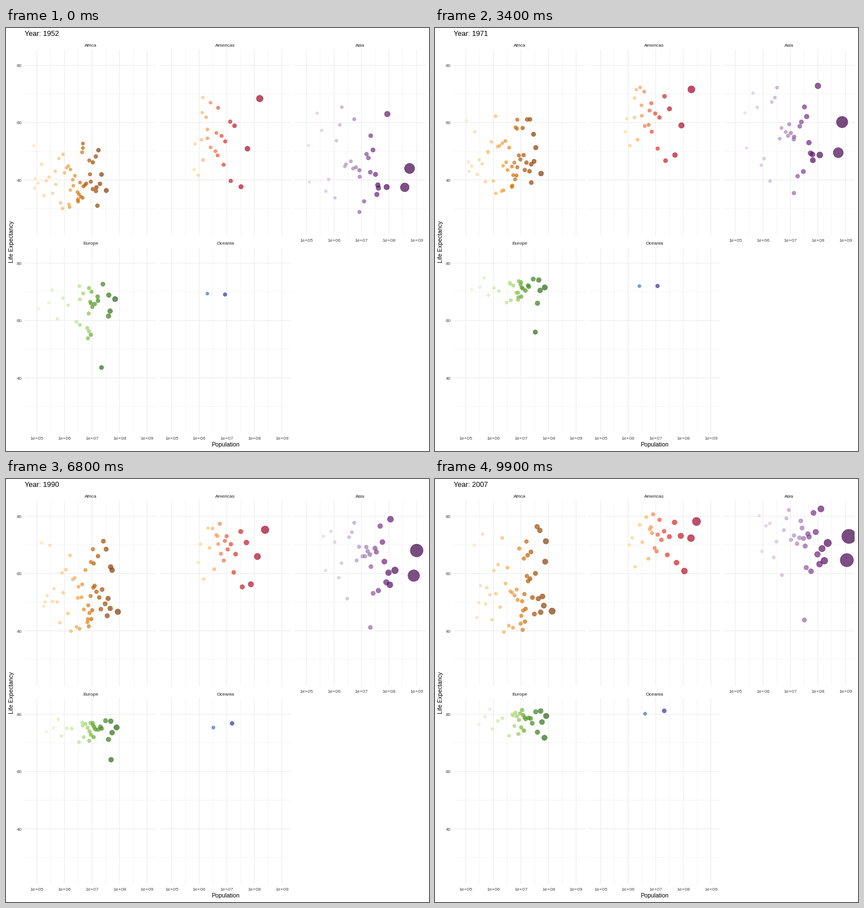
Recreate the animation shown at these times as a matplotlib script. Size 748 by 748 pixels, loop 10000 ms.

```python
import numpy as np
import matplotlib.pyplot as plt
from matplotlib.animation import FuncAnimation
from matplotlib.collections import LineCollection
from matplotlib.colors import LinearSegmentedColormap
from matplotlib.patches import Rectangle

SIZE, DPI = 748, 64
PT = 0.955 * 72 / DPI              # theme units to points
FRAMES, STEP = 100, 100
LEFT, TOP, PW, PH = 33.1, 37.9, 232.8, 328.7
PITCH_X, PITCH_Y = PW + 5.5, 350
LOG_MIN, LOG_MAX = 4.561, 9.337
LIFE_MIN, LIFE_MAX = 20.649, 85.553
POP_MIN, POP_MAX = 6.0e4, 1.319e9
START, END = 1952, 2007
LIFE_YEARS = (START, 1967, 1985, END)
QUARTILES = np.linspace(0, 1, 5)

rng = np.random.default_rng(7)
plt.rcParams["font.family"] = ["Liberation Sans", "DejaVu Sans"]
fig = plt.figure(figsize=(SIZE / DPI, SIZE / DPI), dpi=DPI, facecolor="white")
ax = fig.add_axes([0, 0, 1, 1])
ax.set(xlim=(0, SIZE), ylim=(SIZE, 0))
ax.axis("off")


def text(x, y, s, size, color="black", ha="center", **kw):
    return ax.text(x, y, s, fontsize=size * PT, color=color, ha=ha, va="baseline", **kw)


def ranks(values):
    return np.argsort(np.argsort(values))


class Panel:
    def __init__(self, name, col, row, *stops):
        self.name, self.stops = name, stops
        self.x0, self.y0 = LEFT + col * PITCH_X, TOP + row * PITCH_Y
        self.logs, self.lives = [], []

    def country(self, pop_start, pop_end, *life):
        """One country: population in millions, life expectancy at LIFE_YEARS."""
        self.logs.append(6 + np.log10([pop_start, pop_end]))
        self.lives.append(life)

    def crowd(self, n, logs_start, logs_end, ranges, drift=0.3):
        """n countries spread over population quartiles and (low, middle, high) life ranges."""
        u = (np.arange(n) + rng.uniform(-0.3, 0.3, n)) / (n - 1)
        start = np.interp(u, QUARTILES, logs_start) + rng.normal(0, 0.05, n)
        self.logs.extend(np.column_stack([start, np.interp(u, QUARTILES, logs_end)]))
        order = rng.random(n)
        columns = []
        for low, mid, high in ranges:
            s = 2 * ranks(order) / (n - 1) - 1
            s *= np.abs(s) ** 0.4          # gather towards the middle
            columns.append(np.interp(s, (-1, 0, 1), (low, mid, high)))
            order = order + rng.normal(0, drift / 3, n)
        self.lives.extend(np.column_stack(columns))

    def px(self, log_pop):
        return self.x0 + (log_pop - LOG_MIN) / (LOG_MAX - LOG_MIN) * PW

    def py(self, life):
        return self.y0 + (LIFE_MAX - life) / (LIFE_MAX - LIFE_MIN) * PH

    def grid(self, logs, lives, width):
        x0, y0 = self.x0, self.y0
        lines = [[(self.px(v), y0), (self.px(v), y0 + PH)] for v in logs]
        lines += [[(x0, self.py(v)), (x0 + PW, self.py(v))] for v in lives]
        art = LineCollection(lines, colors="#EBEBEB", linewidths=width * PT, zorder=1)
        art.set_snap(False)
        ax.add_collection(art, autolim=False)

    def build(self):
        self.grid(np.arange(5.5, 9), (30, 50, 70), 0.53)
        self.grid(range(5, 10), (40, 60, 80), 1.07)
        text(self.x0 + PW / 2, self.y0 - 4.8, self.name, 8.8, "#1A1A1A")
        self.logs, self.lives = np.array(self.logs), np.array(self.lives)
        n = len(self.logs)
        cmap = LinearSegmentedColormap.from_list(self.name, self.stops, N=n)
        colors = cmap(ranks(-self.logs[:, 1]))
        colors[:, 3] = 0.7
        self.dots = ax.scatter(np.zeros(n), np.zeros(n), c=colors, edgecolors=colors,
                               linewidths=0.71 * PT, zorder=2)
        self.dots.set_clip_path(Rectangle((self.x0, self.y0), PW, PH, transform=ax.transData))

    def x_labels(self):
        for v in range(5, 10):
            text(self.px(v), self.y0 + PH + 11.0, f"1e+0{v}", 8.8, "#4D4D4D")

    def y_labels(self):
        for v in (40, 60, 80):
            text(self.x0 - 4.7, self.py(v) + 3.0, str(v), 8.8, "#4D4D4D", "right")

    def update(self, year):
        t = (year - START) / (END - START)
        logs = self.logs[:, 0] * (1 - t) + self.logs[:, 1] * t
        life = np.array([np.interp(year, LIFE_YEARS, row) for row in self.lives])
        share = np.clip((10 ** logs - POP_MIN) / (POP_MAX - POP_MIN), 0, 1)
        size = 2 + 10 * np.sqrt(share)
        diameter = 0.75 * (size * 2.845 + 0.945)
        self.dots.set_offsets(np.column_stack([self.px(logs), self.py(life)]))
        self.dots.set_sizes((diameter * PT) ** 2)


africa = Panel("Africa", 0, 0, "#7F3B08", "#B35806", "#E08214", "#FDB863", "#FEE0B6")
africa.crowd(50, (4.78, 5.92, 6.42, 6.75, 7.32), (5.30, 6.28, 6.98, 7.26, 7.88),
             [(30, 38.8, 52.7), (34, 44.6, 61.5), (40, 51.6, 71), (39.6, 52.9, 76.4)])
africa.country(22.2, 80.3, 41.9, 49.3, 58.4, 71.3)
africa.country(33.1, 135, 36.3, 41, 46.6, 46.9)

americas = Panel("Americas", 1, 0, "#A50026", "#D73027", "#F46D43", "#FDAE61", "#FEE090")
americas.crowd(23, (5.82, 6.18, 6.46, 6.80, 7.48), (6.02, 6.72, 6.95, 7.32, 8.04),
               [(37.6, 54, 68.8), (45, 60.5, 72.1), (53, 69, 76.5), (60.9, 72.9, 80.7)])
americas.country(56.6, 190, 50.9, 57.6, 64.2, 72.4)
americas.country(157.6, 301, 68.4, 70.8, 74.5, 78.2)

asia = Panel("Asia", 2, 0, "#40004B", "#762A83", "#9970AB", "#C2A5CF", "#E7D4E8")
asia.crowd(28, (5.08, 6.13, 6.72, 7.25, 7.67), (5.85, 6.75, 7.36, 7.68, 8.23),
           [(32.5, 44.5, 65.4), (37, 53.7, 71), (49, 65, 76.5), (59.5, 72.4, 82.2)])
asia.country(8.43, 31.9, 28.8, 34, 40.5, 43.8)
asia.country(82.1, 224, 37.5, 46, 58.5, 70.7)
asia.country(86.5, 127.5, 63, 71.4, 78, 82.6)
asia.country(372, 1110, 37.4, 47.2, 57.8, 64.7)
asia.country(556, 1319, 44, 58.4, 66.7, 73)

europe = Panel("Europe", 0, 1, "#276419", "#4D9221", "#7FBC41", "#B8E186", "#E6F5D0")
europe.crowd(28, (5.17, 6.55, 6.85, 7.02, 7.70), (5.48, 6.67, 6.96, 7.18, 7.79),
             [(53.8, 65.9, 72.7), (64.8, 70.5, 74.2), (69.6, 74.2, 77.2), (72.5, 78.6, 81.8)])
europe.country(22.2, 71.2, 43.6, 54.3, 62, 71.8)
europe.country(69.1, 82.4, 67.5, 70.8, 74.3, 79.4)

oceania = Panel("Oceania", 1, 1, "#313695", "#4575B4")
oceania.country(8.69, 20.4, 69.1, 71.1, 75.6, 81.2)
oceania.country(1.99, 4.12, 69.4, 71.5, 74, 80.2)

panels = (africa, americas, asia, europe, oceania)
for panel in panels:
    panel.build()
for panel in (asia, europe, oceania):
    panel.x_labels()
for panel in (africa, europe):
    panel.y_labels()
text(387.8, 739.6, "Population", 11)
text(13.0, 377.4, "Life Expectancy", 11, rotation=90, rotation_mode="anchor")
title = text(LEFT, 14.0, "", 13.2, ha="left")


def draw(i):
    year = START + (END - START) * i / (FRAMES - 1)
    title.set_text(f"Year: {round(year)}")
    for panel in panels:
        panel.update(year)
    return [title] + [p.dots for p in panels]


anim = FuncAnimation(fig, draw, frames=FRAMES, interval=STEP, repeat=True)
plt.show()
```
